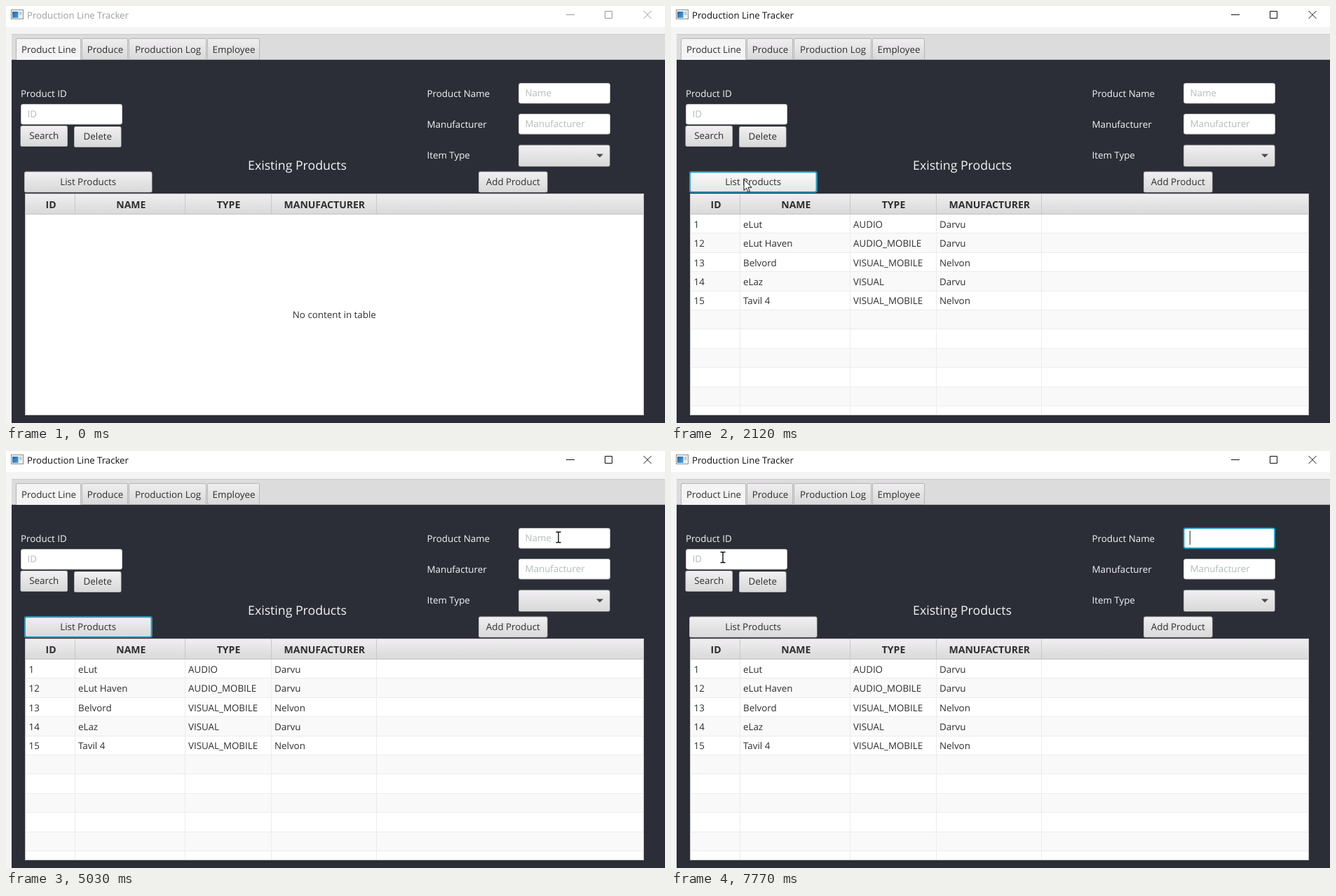
Recreate the animation shown at these times as an HTML page. Size 940 px wide and 596 px high, loop 8 s.

```html
<!DOCTYPE html>
<html lang="en">
<head>
<meta charset="utf-8">
<title>Production Line Tracker</title>
<style>
html, body { margin: 0; width: 100%; height: 100%; overflow: hidden; background: #fff; }
svg { display: block; width: 940px; height: 596px; }
text { font: 13.35px "Open Sans", "Noto Sans", sans-serif; fill: #2e2e2e; text-rendering: geometricPrecision; white-space: pre; }
.light { fill: #f6f6f6; }
.prompt { fill: #b3bcbc; }
.head { font-weight: 700; font-size: 14px; }
.mid { text-anchor: middle; }
</style>
</head>
<body>
<svg id="stage" viewBox="0 0 940 596" xmlns="http://www.w3.org/2000/svg">
  <defs>
    <linearGradient id="plain" x2="0" y2="1"><stop stop-color="#f0eef0"/><stop offset="1" stop-color="#d9d9d9"/></linearGradient>
    <linearGradient id="hover" x2="0" y2="1"><stop stop-color="#f9f9f9"/><stop offset="1" stop-color="#e6e6e6"/></linearGradient>
    <linearGradient id="armed" x2="0" y2="1"><stop stop-color="#e0e0e0"/><stop offset="1" stop-color="#cccccc"/></linearGradient>
    <linearGradient id="pane" x2="1" y2="1"><stop stop-color="#1f66ad"/><stop offset="1" stop-color="#4aa3dc"/></linearGradient>
  </defs>
</svg>
<script>
const LOOP = 8000;
const CLICK_LIST = 1810, ARMED = 1890, LOADED = 2120, CLICK_NAME = 5650;
const stage = document.getElementById("stage");

function add(tag, attrs, parent = stage) {
  const el = document.createElementNS("http://www.w3.org/2000/svg", tag);
  for (const k in attrs) el.setAttribute(k, attrs[k]);
  return parent.appendChild(el);
}
function rect(x, y, width, height, fill, more, parent) {
  return add("rect", { x, y, width, height, fill, ...more }, parent);
}
function line(d, stroke, parent) {
  return add("path", { d, stroke, fill: "none" }, parent);
}
function label(str, x, y, cls = "", parent) {
  const el = add("text", { x, y, class: cls }, parent);
  el.textContent = str;
  return el;
}
function show(el, on) { el.setAttribute("visibility", on ? "visible" : "hidden"); }
function inside(p, b) { return p.x >= b.x && p.x < b.x + b.w && p.y >= b.y && p.y < b.y + b.h; }

// Title bar
rect(0, 0, 940, 30, "#fff");
rect(7.5, 5.5, 17, 13, "#f1f1f1", { stroke: "#8b9094" });
rect(9, 8, 8.5, 9, "url(#pane)");
rect(19, 8, 3.5, 5, "#c4c8ca");
const title = label("Production Line Tracker", 30, 17.6);
title.style.fontSize = "13.2px";
const controls = line("M799 12.5h12M854.5 7.5h10v10h-10zM909.5 7l11 11M920.5 7l-11 11", "#999");

// Window body and tabs
rect(0, 30, 940, 566, "#f4f4f4");
rect(8, 40, 932, 37, "#dcdcdc");
line("M8 40.5H940", "#cbcbcb");
line("M8 76.5H940", "#bdbdbd");
function tab(str, x, w, on) {
  rect(x + .5, 46.5, w - 1, 30, on ? "#f4f4f4" : "url(#plain)", { stroke: "#b5b5b5", rx: 1.5 });
  if (on) rect(x + 1, 75, w - 2, 2, "#f4f4f4");
  label(str, x + w / 2 + .5, 67, "mid");
}
tab("Product Line", 14, 93, true);
tab("Produce", 108, 66);
tab("Production Log", 175, 111);
tab("Employee", 287, 75);
rect(8, 77, 932, 519, "#2b2e37");

label("Product ID", 21, 130.3, "light");
label("Product Name", 600.5, 129.5, "light");
label("Manufacturer", 600.5, 174, "light");
label("Item Type", 600.5, 218.4, "light");
label("Existing Products", 415.5, 233.5, "light mid").style.fontSize = "17.7px";

// Controls
function ring(b) {
  return rect(b.x, b.y, b.w, b.h, "none", { stroke: "#149bc8", "stroke-width": 1.8, rx: 2.5 });
}
function button(str, x, y, w, h = 30) {
  const b = { x, y, w, h };
  rect(x, y, w, h, "#b5b5b5", { rx: 2.5 });
  rect(x + 1, y + 1, w - 2, h - 2, "#fafafa", { rx: 2 });
  b.body = rect(x + 1, y + 2, w - 2, h - 3, "url(#plain)", { rx: 1.5 });
  label(str, x + w / 2, y + 19.3, "mid");
  return b;
}
function field(str, x, y, w) {
  const b = { x, y, w, h: 29.5 };
  rect(x + .5, y + .5, w - 1, 28.5, "#fff", { stroke: "#c4c4c4", rx: 2.5 });
  b.prompt = label(str, x + 9.5, y + 19.4, "prompt");
  return b;
}
const idField = field("ID", 21, 140, 145);
const nameField = field("Name", 731, 110, 131);
const fields = [idField, nameField, field("Manufacturer", 731, 154, 131)];
const listBtn = button("List Products", 26, 236.5, 182.5);
const addBtn = button("Add Product", 674, 236.5, 98.5);
const buttons = [listBtn, addBtn, button("Search", 20.5, 171, 67.5), button("Delete", 97, 172, 67.5)];
button("", 731, 198.5, 130.5, 31);
add("path", { d: "M842 211.5h10l-5 5z", fill: "#4a4a4a" });
const listRing = ring({ x: 27, y: 237.3, w: 180.5, h: 28.5 });
const nameRing = ring({ x: 731.5, y: 110.3, w: 129.5, h: 28.5 });
const caret = rect(739.7, 114, 1.2, 20, "#444");

// Table
const dividers = [98.5, 255.5, 378.5, 528.5];
const rowTop = i => 298 + 27.4 * i;
rect(27.5, 268.5, 882, 316, "#fff", { stroke: "#c4c4c4" });
rect(28, 269, 881, 28.5, "url(#plain)");
line("M28 297.5H909", "#c2c2c2");
for (const x of dividers) line(`M${x} 269V297`, "#c8c8c8");
[["ID", 64], ["NAME", 178.3], ["TYPE", 317.5], ["MANUFACTURER", 454.3]]
  .forEach(([s, x]) => label(s, x, 289.4, "head mid"));
const empty = label("No content in table", 468.3, 446.3, "mid");

const rows = add("g", {});
for (let i = 0; i < 11; i++) {
  const y = Math.round(rowTop(i)), end = Math.min(584, Math.round(rowTop(i + 1)));
  rect(28, y, 881, end - y, i % 2 ? "#f9f9f9" : "#fff", {}, rows);
  if (i) line(`M28 ${y - .5}H909`, "#ececec", rows);
}
for (const x of dividers) line(`M${x} 298V584`, "#ebebeb", rows);
[
  ["1", "eLut", "AUDIO", "Darvu"],
  ["12", "eLut Haven", "AUDIO_MOBILE", "Darvu"],
  ["13", "Belvord", "VISUAL_MOBILE", "Nelvon"],
  ["14", "eLaz", "VISUAL", "Darvu"],
  ["15", "Tavil 4", "VISUAL_MOBILE", "Nelvon"]
].forEach((cells, i) => cells.forEach((s, c) =>
  label(s, [32.5, 103, 260, 383][c], rowTop(i) + 18.8, "", rows)));

// Pointer
const arrow = add("path", {
  d: "M0 0V15.6L3.6 12.2 6 18 8.4 17 6 11.3H11Z",
  fill: "#fff", stroke: "#111", "stroke-linejoin": "round"
});
const beam = add("path", {
  d: "M-3.5-7.5H-1L0-6.5 1-7.5H3.5M0-6.5V6.5M-3.5 7.5H-1L0 6.5 1 7.5H3.5",
  fill: "none", stroke: "#111", "stroke-width": 1.4
});

// Bursts of movement: first step, last step, step count, end point, bend (optional)
const bursts = [
  [70, 220, 3, 426, 359],
  [370, 850, 7, 84, 225, 230, 222],
  [1090, 1570, 7, 104, 248],
  [2280, 2680, 6, 217, 287],
  [3070, 3390, 5, 242, 284],
  [3700, 3860, 3, 153.5, 223, 200, 215],
  [4170, 4170, 1, 144.5, 225],
  [4250, 4320, 2, 468, 266],
  [4630, 4870, 4, 820, 128, 660, 270],
  [4950, 5030, 2, 788, 123.3],
  [5730, 5970, 4, 756, 124],
  [6590, 6750, 3, 155.5, 344],
  [6990, 7380, 6, 66.5, 273],
  [7610, 7770, 3, 74, 152, 70, 155]
];
function pointer(t) {
  let p = { x: 1000, y: 680 };
  for (const [from, to, n, x, y, bx = (p.x + x) / 2, by = (p.y + y) / 2] of bursts) {
    if (t < from) break;
    const gap = (to - from) / (n - 1) || 1;
    const u = Math.min(n, Math.floor((t - from) / gap + 1e-6) + 1) / n, v = 1 - u;
    p = {
      x: v * v * p.x + 2 * u * v * bx + u * u * x,
      y: v * v * p.y + 2 * u * v * by + u * u * y
    };
  }
  return p;
}

function draw(t) {
  const active = t >= CLICK_LIST, loaded = t >= LOADED, typing = t >= CLICK_NAME;
  title.style.fill = active ? "#111" : "#98a09c";
  controls.setAttribute("stroke", active ? "#111" : "#999");
  show(empty, !loaded);
  show(rows, loaded);
  show(listRing, active && !typing);
  show(nameRing, typing);
  show(nameField.prompt, !typing);
  show(caret, typing && Math.floor(Math.max(0, t - 5700) / 500) % 2 === 0);

  const p = pointer(t), text = fields.some(f => inside(p, f));
  show(arrow, !text);
  show(beam, text);
  (text ? beam : arrow).setAttribute("transform", `translate(${p.x.toFixed(1)} ${p.y.toFixed(1)})`);
  for (const b of buttons) {
    const pressed = b === listBtn && t >= ARMED && t < LOADED;
    b.body.setAttribute("fill", `url(#${pressed ? "armed" : inside(p, b) ? "hover" : "plain"})`);
  }
}

const start = performance.now();
function tick() {
  draw((performance.now() - start) % LOOP);
  requestAnimationFrame(tick);
}
tick();
</script>
</body>
</html>
```
